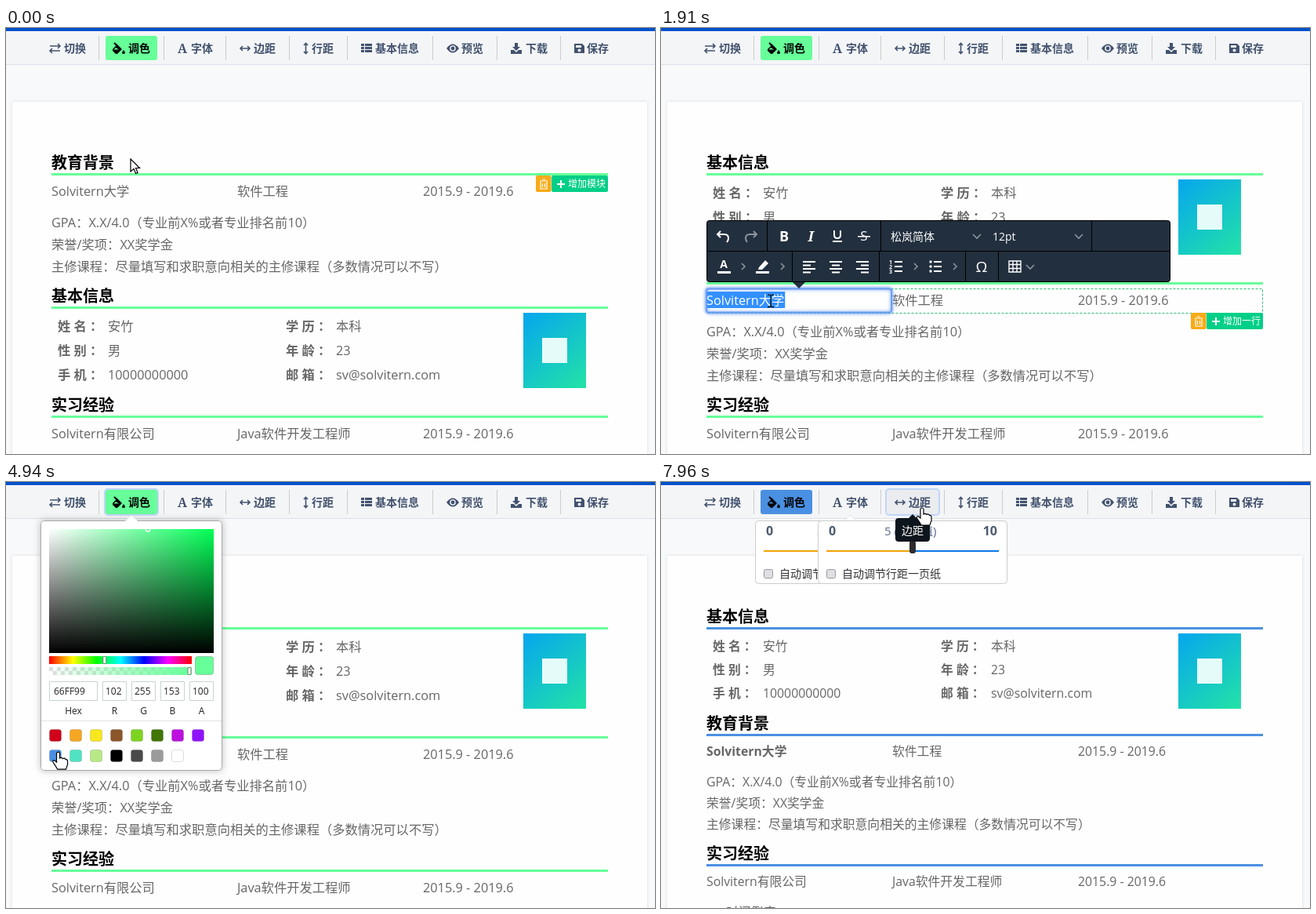
These frames come from a looping animation (828 by 543 pixels, 8 s). An HTML page with a canvas:

```html
<!DOCTYPE html>
<html lang="zh-CN">
<head>
<meta charset="utf-8">
<title>简历编辑器</title>
<style>
html, body { margin: 0; width: 100%; height: 100%; overflow: hidden; background: #f8f9fb; }
canvas { display: block; }
</style>
</head>
<body>
<canvas id="stage" width="828" height="543"></canvas>
<script>
const LOOP = 8000;
const ctx = document.getElementById('stage').getContext('2d');
const SANS = '"Open Sans","Noto Sans CJK SC","Noto Sans CJK",sans-serif';
const SERIF = '"Noto Serif",serif';
const INK = '#666', SLATE = '#42526e';

const GREEN = { hex: '66FF99', rgb: [102, 255, 153], hue: 140, s: .6, v: 1 };
const BLUE = { hex: '4A90E2', rgb: [74, 144, 226], hue: 212, s: .672, v: .886 };
const SWATCHES = ('D0021B F5A623 F8E71C 8B572A 7ED321 417505 BD10E0 9013FE ' +
  '4A90E2 50E3C2 B8E986 000000 4A4A4A 9B9B9B FFFFFF').split(' ');

// Page metrics for each font-size setting
const LEVELS = [[16.3, 39, 31, 139, 37, 77, 28, 170], [16.2, 38, 30, 136, 37, 77, 28, 170], [15.8, 38, 30, 136, 36, 75, 27, 166]]
  .map(([size, infoTop, infoStep, infoHeight, row, body, step, height]) =>
    ({ size, infoTop, infoStep, infoHeight, row, body, step, height }));

// Pointer path: time, x, y, shape from then on
const PATH = [
  [0, 159, 167, 'arrow'], [300, 159, 167, 'arrow'], [750, 166, 372, 'arrow'], [1000, 166, 372, 'arrow'],
  [1070, 170, 366, 'arrow'], [1250, 152, 350, 'beam'], [1500, 140, 348, 'beam'], [1910, 140, 348, 'beam'],
  [2080, 148, 312, 'arrow'], [2350, 157, 266, 'arrow'], [2560, 157, 266, 'arrow'], [2690, 168, 243, 'beam'],
  [2750, 170, 233, 'beam'], [3030, 172, 140, 'arrow'], [3400, 151, 22, 'hand'], [3500, 151, 13, 'hand'],
  [3900, 151, 13, 'hand'], [4350, 148, 28, 'arrow'], [4850, 72, 335, 'hand'], [5000, 63, 350, 'hand'],
  [5250, 63, 350, 'arrow'], [5650, 220, 50, 'hand'], [5780, 233, 22, 'hand'], [6200, 233, 22, 'hand'],
  [6500, 240, 68, 'hand'], [6750, 240, 83, 'hand'], [6930, 240, 83, 'hand'], [7070, 227, 82, 'hand'],
  [7240, 212, 82, 'hand'], [7360, 212, 82, 'hand'], [7640, 333, 33, 'hand'], [LOOP, 333, 33, 'hand']];
const PRESSES = [[300, 1000], [1480, 1560], [1640, 1720], [2430, 2520], [3030, 3100],
  [3520, 3600], [5060, 5150], [6040, 6120], [6880, 7260], [7710, 7790]];

const POINTERS = {
  arrow: 'M0 0V16L4 12.5 6.5 18.5 9 17.5 6.5 11.5H11.5Z',
  hand: 'M-2 1.5Q0-1.5 2 1.5V8Q4 6.5 6 8.5 8 7 9.5 9.5 12 9 12 12V16Q11 19 10 22H-1Q-3 18-6 14-8 11-5 10.5L-2 13Z',
  beam: 'M-4-8Q0-8 0-6V6Q0 8-4 8M4-8Q0-8 0-6M0 6Q0 8 4 8'
};

function text(s, x, y, size = 16, color = INK, weight = 400, align = 'left', family = SANS) {
  ctx.font = `${weight} ${size}px ${family}`;
  ctx.fillStyle = color;
  ctx.textAlign = align;
  ctx.fillText(s, x, y + size * .37);
}
function rect(x, y, w, h, color) {
  ctx.fillStyle = color;
  ctx.fillRect(x, y, w, h);
}
function box(x, y, w, h, r, fill, stroke, width = 1) {
  ctx.beginPath();
  ctx.roundRect(x, y, w, h, r);
  if (fill) { ctx.fillStyle = fill; ctx.fill(); }
  if (stroke) { ctx.strokeStyle = stroke; ctx.lineWidth = width; ctx.stroke(); }
}
function shape(d, x, y, fill, stroke, width = 1.6) {
  const path = new Path2D(d);
  ctx.save();
  ctx.translate(x, y);
  if (fill) { ctx.fillStyle = fill; ctx.fill(path, 'evenodd'); }
  if (stroke) { ctx.strokeStyle = stroke; ctx.lineWidth = width; ctx.stroke(path); }
  ctx.restore();
}
function disc(x, y, r, fill, stroke, width) {
  box(x - r, y - r, 2 * r, 2 * r, r, fill, stroke, width);
}
function gradient(x0, y0, x1, y1, ...colors) {
  const g = ctx.createLinearGradient(x0, y0, x1, y1);
  colors.forEach((c, i) => g.addColorStop(i / (colors.length - 1), c));
  return g;
}
function withShadow(color, blur, draw) {
  ctx.save();
  ctx.shadowColor = color;
  ctx.shadowBlur = blur;
  draw();
  ctx.restore();
}
function dashed(y, h) {
  ctx.setLineDash([3, 2]);
  box(58.5, y + .5, 709, h - 1, 0, null, '#2cc078');
  ctx.setLineDash([]);
}

function header(t, accent) {
  rect(0, 0, 828, 47, '#f4f5f7');
  rect(0, 0, 828, 4, '#0052cc');
  rect(0, 46, 828, 1, '#dcdfe4');
  for (const x of [118, 201, 280, 361, 435, 544, 626, 707]) rect(x, 10, 1, 31, '#ccc');

  if (t > 5680 && t < 6300) box(210, 10, 62, 31, 3, '#ebecf0');
  if (t > 7590) box(288, 10, 66, 31, 3, '#ebecf0');
  box(127, 10, 66, 31, 3, '#' + accent.hex);
  const ring = (x, w) => box(x - 1, 9, w + 2, 33, 4, null, '#bfd6f7', 2);
  if (t > 3520 && t < 5060) ring(127, 66);
  if (t > 6040 && t < 6880) ring(210, 62);
  if (t > 7710) ring(288, 66);

  shape('M0-3H13M10-6l3 3-3 3M13 3H0M3 0 0 3 3 6', 56, 26, null, SLATE);
  shape('M5-6 12 1 6 7H4L0 3V1L4-3ZM4-1 1.5 1.5H8ZM14 2Q18 7 14 7T14 2Z', 136, 26, '#000');
  shape('M2-7 6-3', 136, 26, null, '#000', 2);
  text('A', 219, 26, 16, SLATE, 900, 'left', SERIF);
  shape('M1 0H13M4-3 1 0l3 3M10-3l3 3-3 3', 298, 26, null, SLATE);
  shape('M3.5-6V6M1-4 3.5-6.5 6-4M1 4 3.5 6.5 6 4', 379, 26, null, SLATE);
  for (const y of [20, 24, 28]) { rect(453, y, 4, 3, SLATE); rect(458, y, 9, 3, SLATE); }
  shape('M0 0Q8-11 16 0 8 11 0 0Z', 562, 26, SLATE);
  disc(570, 26, 3.1, SLATE, '#f4f5f7', 1.4);
  shape('M5-7H9V-2H12L7 3 2-2H5ZM0 2H4L7 5 10 2H14V7H0Z', 644, 26, SLATE);
  shape('M0-6H10L13-3V6H0ZM2-4V-1H9V-4ZM4.5 2.5a2 2 0 1 0 4 0a2 2 0 1 0-4 0', 725, 26, SLATE);

  const labels = { 切换: 74, 调色: 156, 字体: 236, 边距: 316, 行距: 390, 基本信息: 471, 预览: 581, 下载: 663, 保存: 741 };
  for (const [s, x] of Object.entries(labels)) text(s, x, 26, 14, s === '调色' ? '#000' : SLATE, 700);
}

function heading(s, y, accent) {
  text(s, 58, y + 1, 20, '#000', 700);
  rect(58, y + 14, 710, 3, '#' + accent.hex);
}
function columns(y, size, first, second, bold) {
  text(first, 58, y, size, INK, bold ? 700 : 400);
  text(second, 295, y, size);
  text('2015.9 - 2019.6', 532, y, size);
}
function education(y, m, accent, bold) {
  heading('教育背景', y, accent);
  columns(y + m.row, m.size, 'Solvitern大学', '软件工程', bold);
  ['GPA：X.X/4.0（专业前X%或者专业排名前10）', '荣誉/奖项：XX奖学金', '主修课程：尽量填写和求职意向相关的主修课程（多数情况可以不写）']
    .forEach((s, i) => text(s, 58, y + m.body + i * m.step, m.size));
}
function info(y, m, accent) {
  heading('基本信息', y, accent);
  [['姓 名 ：', '安竹', '学 历 ：', '本科'], ['性 别 ：', '男', '年 龄 ：', '23'],
    ['手 机 ：', '10000000000', '邮 箱 ：', 'sv@solvitern.com']].forEach((cells, i) =>
    cells.forEach((s, j) => text(s, [66, 130, 357, 421][j], y + m.infoTop + i * m.infoStep, m.size, INK, j % 2 ? 400 : 700)));
  rect(660, y + 22, 80, 96, gradient(660, y + 22, 740, y + 118, '#06a6ee', '#22e3a6'));
  rect(684, y + 54, 32, 32, '#e4fbfa');
}
function internship(y, m, accent) {
  heading('实习经验', y, accent);
  columns(y + m.row, m.size, 'Solvitern有限公司', 'Java软件开发工程师');
  disc(65, y + m.body, 2.5, '#4a90e2');
  text('时间倒序', 83, y + m.body, m.size);
}

// Action buttons, right-aligned to the page
function actions(y, label, template) {
  let x = 768;
  if (template) {
    x -= 85;
    box(x + 1, y, 84, 21, 2, '#0091ff');
    box(x + 11.5, y + 4.5, 12, 12, 1, null, '#fff', 1.3);
    shape('M-4 0H4M0-4V4', x + 17.5, y + 10.5, null, '#fff', 1.5);
    text('内容模板', x + 29, y + 10.5, 12, '#fff');
  }
  x -= 72;
  box(x, y, 72, 21, 2, '#00cf87');
  shape('M-5 0H5M0-5V5', x + 12, y + 11, null, '#fff', 2);
  text(label, x + 21, y + 10.5, 12, '#fff');
  box(x - 20, y, 19.5, 21, 2, '#f9ab16');
  shape('M-5-4H5M-2-6H2M-4-3V6H4V-3M-1.5-1V4M1.5-1V4', x - 10, y + 11, null, '#fff', 1.2);
}

function page(t, accent) {
  const m = LEVELS[t < 6990 ? 0 : t < 7150 ? 1 : 2];
  const bold = t > 2470;
  withShadow('#0002', 3, () => rect(8, 94, 810, 460, '#fefefe'));
  const swapped = t > 560, top = 171;
  const infoY = swapped ? top : top + m.height;
  const eduY = swapped ? top + m.infoHeight : top;
  info(infoY, m, accent);
  education(eduY, m, accent, bold);
  internship(top + m.infoHeight + m.height, m, accent);

  if (t < 1000) actions(eduY + 17, '增加模块');
  else if (t < 1200) { dashed(372, 86); actions(458, '增加一行', true); }
  else if (t < 2000) { dashed(332, 32); actions(363, '增加一行'); }
  if (t > 2820 && t < 2990) actions(188, '增加模块');
}

function editor(t) {
  if (t < 1500 || t > 2900) return;
  const bold = t > 2470;
  withShadow('#4c8bf5', 4, () => box(58, 332.5, 236, 30, 3, '#fff', '#6d9df0', 2));
  if (t > 1690) {
    ctx.font = `${bold ? 700 : 400} ${LEVELS[0].size}px ${SANS}`;
    rect(59, 336, ctx.measureText('Solvitern大学').width, 21, '#3390ff');
  }
  text('Solvitern大学', 58, 347, LEVELS[0].size, t > 1690 ? '#fff' : INK, bold ? 700 : 400);
  if (t < 1910) return;

  const white = '#fff', grey = '#8b949e';
  box(58.5, 245.5, 591, 78, 3, '#222f3e', '#000');
  shape('M-8 0H8L0 8Z', 176, 324, '#222f3e');
  rect(58, 284, 592, 1, '#000');
  for (const x of [135, 280, 549]) rect(x, 246, 1, 38, '#000');
  for (const x of [167, 278, 388, 430]) rect(x, 285, 1, 38, '#000');
  if (bold) box(140, 248, 34, 34, 3, '#717d89');

  const undo = 'M-3-7-7-3-3 1M-7-3H2Q7-3 7 2 7 5 5 7';
  shape(undo, 79, 266, null, white, 2);
  ctx.save();
  ctx.translate(115, 266);
  ctx.scale(-1, 1);
  shape(undo, 0, 0, null, grey, 2);
  ctx.restore();
  text('B', 157, 265, 18, white, 700, 'center');
  text('I', 191, 265, 18, white, 'italic 700', 'center', SERIF);
  shape('M-4-7V-1Q-4 3 0 3T4-1V-7M-6 7H6', 225, 265, null, white, 2);
  text('S', 259, 265, 17, white, 400, 'center');
  rect(251, 265, 16, 1.5, white);
  text('松岚简体', 293, 266, 14, white);
  text('12pt', 423, 266, 14, white);
  for (const [x, y] of [[403, 265], [533, 265], [471, 304]]) shape('M-5-2 0 3 5-2', x, y, null, grey);
  for (const x of [105, 155, 325, 375]) shape('M-2-4 2 0-2 4', x, 304, null, grey);

  text('A', 80, 301, 14, white, 700, 'center');
  rect(72, 310, 17, 3, white);
  shape('M-4 2 4-7 8-3 0 5-5 5Z', 129, 303, white);
  rect(121, 310, 17, 3, white);
  [0, .5, 1].forEach((side, k) => {
    for (let i = 0; i < 4; i++) {
      const w = i % 2 ? 10 : 16;
      rect(181 + 34 * k + (16 - w) * side, 297 + 4.5 * i, w, 2, white);
    }
  });
  for (let i = 0; i < 3; i++) {
    rect(298, 297 + 6 * i, 10, 2, white);
    text(i + 1, 291, 298 + 6 * i, 7, white, 700);
    rect(348, 297 + 6 * i, 10, 2, white);
    disc(344, 298 + 6 * i, 1.7, white);
  }
  text('Ω', 409, 304, 19, white, 400, 'center');
  shape('M-7-7H8V7H-7ZM-7-2.5H8M-7 2.5H8M-2-7V7M3-7V7', 451, 304, null, white, 1.4);
}

function panel(x, y, w, h, tip, border) {
  box(x + .5, y + .5, w - 1, h - 1, 4, '#fff', border);
  shape('M-8 1 0-7 8 1V2H-8Z', tip, y, '#fff');
  shape('M-8 .5 0-7 8 .5', tip, y, null, '#ddd', .8);
}

function picker(t) {
  const c = t < 5110 ? GREEN : BLUE, css = '#' + c.hex;
  withShadow('#0004', 9, () => box(44, 49, 232, 319, 4, '#fff'));
  panel(44, 49, 232, 319, 160, '#aaa');
  rect(55, 60, 210, 158, gradient(55, 0, 265, 0, '#fff', `hsl(${c.hue} 100% 50%)`));
  rect(55, 60, 210, 158, gradient(0, 60, 0, 218, '#0000', '#000'));
  disc(55 + 210 * c.s, 60 + 158 * (1 - c.v), 3, null, '#fff', 1.4);
  rect(55, 222, 182, 10, gradient(55, 0, 237, 0, '#f00', '#ff0', '#0f0', '#0ff', '#00f', '#f0f', '#f00'));
  for (let i = 0; i < 72; i++) rect(55 + 5 * (i >> 1), 236 + 5 * (i % 2), 5, 5, (i + (i >> 1)) % 2 ? '#fff' : '#ddd');
  rect(55, 236, 182, 10, gradient(55, 0, 237, 0, css + '00', css));
  box(55 + 182 * c.hue / 360 - 2, 222.5, 4, 9, 1, '#fff', '#777');
  box(232, 236.5, 4, 9, 1, '#fff', '#777');
  box(241.5, 222.5, 23, 23, 3, css, '#0003');

  [c.hex, ...c.rgb, 100].forEach((value, i) => {
    const x = i ? 86 + 37 * i : 55, w = i ? 31 : 62;
    box(x + .5, 254.5, w - 1, 24, 0, '#fff', '#c8d2d2');
    text(value, x + (i ? 4 : 6), 267, 12, '#222');
    text(['Hex', 'R', 'G', 'B', 'A'][i], x + w / 2, 292, 12, '#222', 400, 'center');
  });
  rect(45, 304, 230, 1, '#e4e4e4');
  SWATCHES.forEach((hex, i) => {
    const x = 55 + 26 * (i % 8), y = i < 8 ? 315 : 341;
    const draw = () => box(x + .5, y + .5, 15, 15, 3, '#' + hex, '#0002');
    if (i === 8 && c === BLUE) withShadow('#2684ff', 7, draw);
    else draw();
  });
}

function slider(x, value, labelX, handle) {
  panel(x, 49, 242, 81, x + 121, '#ccc');
  text('0', x + 14, 62, 16, '#4d5a70', 700);
  text('10', x + 229, 62, 16, '#4d5a70', 700, 'right');
  text(value, x + labelX, 62, 15, '#5f6b8a');
  rect(x + 11, 87, handle - x - 11, 2, '#f0a30a');
  rect(handle, 87, x + 231 - handle, 2, '#0a78e6');
  box(handle - 4, 75, 8, 16, 3, '#2d2d30');
  box(x + 11.5, 111.5, 11, 11, 2, '#dfe0e4', '#999');
  text('自动调节行距一页纸', x + 31, 117, 14, '#333');
}

function tooltip(label, x) {
  box(x - 22, 46, 44, 30, 4, '#0d151d');
  shape('M-6 1 0-5 6 1Z', x, 46, '#0d151d');
  text(label, x, 62, 14, '#fff', 500, 'center');
}

function pointer(t) {
  const i = PATH.findIndex(p => p[0] > t);
  const [t0, x0, y0, kind] = PATH[i - 1], [t1, x1, y1] = PATH[i];
  const k = (t - t0) / (t1 - t0);
  return { x: x0 + (x1 - x0) * k, y: y0 + (y1 - y0) * k, kind };
}

function draw(t) {
  const accent = t < 5200 ? GREEN : BLUE, p = pointer(t);
  rect(0, 0, 828, 543, '#f8f9fb');
  page(t, accent);
  if (t >= 300 && t < 1000) {
    ctx.save();
    ctx.globalAlpha = .55;
    ctx.translate(p.x - 159, p.y - 167);
    education(171, LEVELS[0], accent);
    ctx.restore();
  }
  editor(t);
  header(t, accent);
  if (t > 3590 && t < 6150) picker(t);
  if (t > 6150) {
    const handle = 241 - 29 * Math.min(1, Math.max(0, (t - 7058) / 180));
    if (t < 6990) slider(120, '5 (默认值)', 85, handle);
    else if (t < 7150) slider(120, '4.5', 88, handle);
    else slider(120, '3.7', 79, handle);
  }
  if (t > 7780) slider(200, '5 (默认值)', 85, 321);
  if (t > 3470 && t < 4420) tooltip('调色', 160);
  if (t > 5740 && t < 6320) tooltip('字体', 241);
  if (t > 7610) tooltip('边距', 321);

  if (PRESSES.some(([from, to]) => t >= from && t < to)) disc(p.x, p.y, 13, '#ffec3dbb');
  const beam = p.kind === 'beam';
  shape(POINTERS[p.kind], p.x, p.y, beam ? null : '#fff', '#000', 1.2);
}

function tick() {
  draw(performance.now() % LOOP);
  requestAnimationFrame(tick);
}
tick();
</script>
</body>
</html>
```
